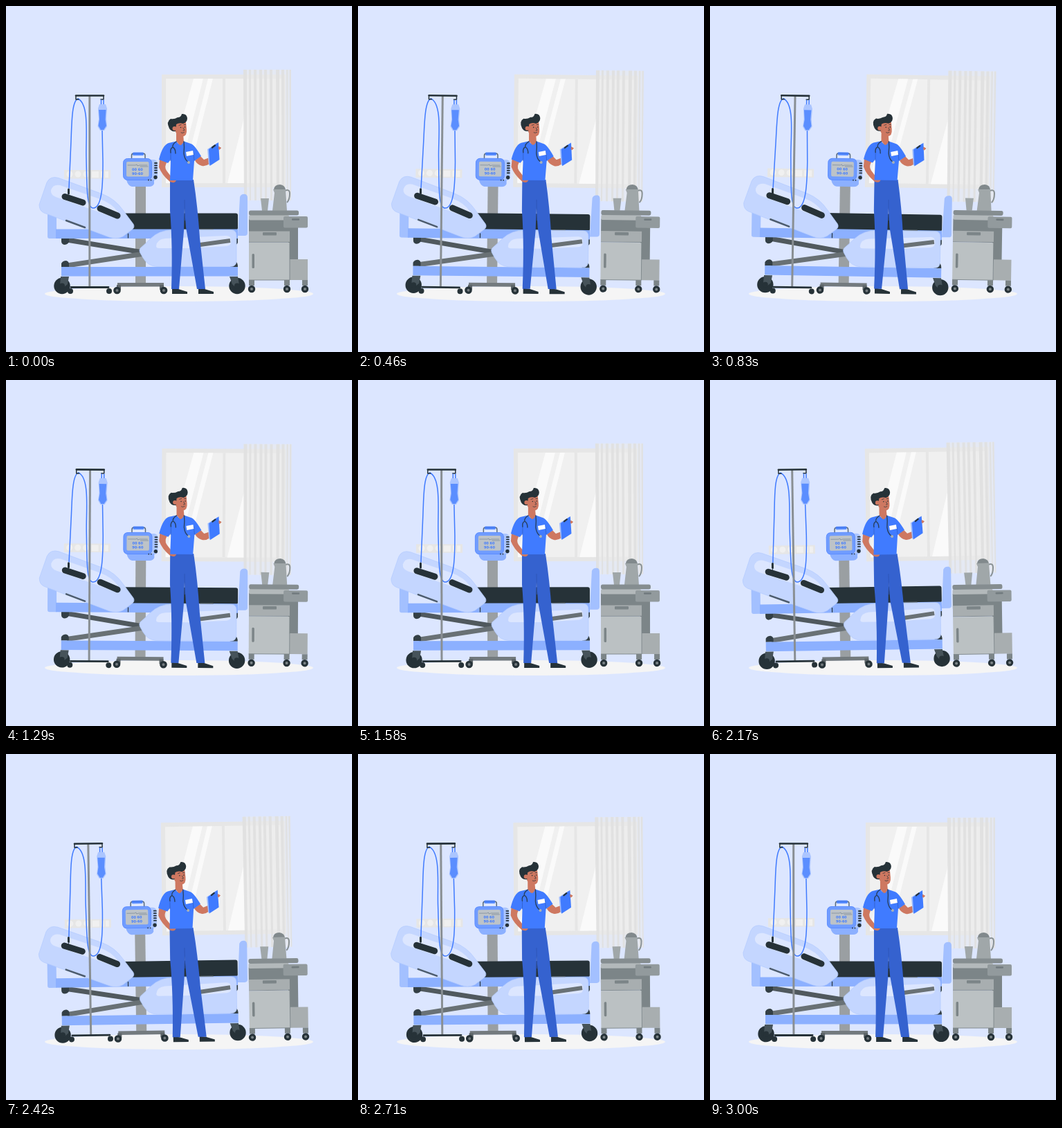
An HTML page for the animation above (3040 ms loop, 500 px wide and 500 px high).

```html
<!DOCTYPE html>
<html lang="en">
<head>
<meta charset="utf-8">
<title>Hospital room</title>
<style>
html, body { margin: 0; width: 100%; height: 100%; overflow: hidden; background: #dce6ff; }
svg { display: block; width: 100%; height: 100%; }
.dark { fill: #263238; }
.blue { fill: #407bff; }
.mid { fill: #8cb0ff; }
.pale { fill: #c4d6ff; }
.sky { fill: #dce6ff; }
.skin { fill: #ce7861; }
.line { fill: none; stroke: #263238; stroke-linecap: round; stroke-linejoin: round; }
.tube { fill: none; stroke: #407bff; stroke-width: 1.5; stroke-linecap: round; }
.readout { font: bold 5px "DejaVu Sans", sans-serif; fill: #407bff; }
</style>
</head>
<body>
<svg viewBox="0 0 500 500">
  <ellipse cx="250" cy="416" rx="194" ry="11" fill="#f5f5f5"/>

  <g data-pivot="248 186">
    <path fill="#e6e6e6" d="M225 99H404V262H225z"/>
    <path fill="#f0f0f0" d="M231 105H398V256H231z"/>
    <path fill="#fafafa" d="M271 105H285L247 256H231V250zM292 105H299L261 256H254zM346 153V256H320z"/>
    <path fill="#e6e6e6" d="M313 105h4v151h-4z"/>
    <path fill="#ebebeb" opacity=".6" d="M343 92H412V281H345z"/>
    <g id="folds" fill="#e0e0e0" opacity=".85"></g>
    <path fill="#e6e6e6" d="M84 237h67v12.500h-67z"/>
    <g fill="#f0f0f0"><circle cx="92" cy="243" r="4.500"/><circle cx="104" cy="243" r="4.500"/><circle cx="116" cy="243" r="4.500"/><path d="M124 239h10v9h-10zM137 239h4v9h-4zM143 239h5v9h-5z"/></g>
  </g>

  <g data-pivot="194 314">
    <path fill="#9a9fa2" d="M187 260h15v141h-15z"/>
    <path fill="#737a7e" d="M161 400H228V405.500H161z"/>
    <path fill="#5d6569" d="M160 403h6v7h-6zM222 403h6v7h-6z"/>
    <g class="dark"><circle cx="160.500" cy="411" r="5.300"/><circle cx="228" cy="411" r="5.300"/></g>
    <g fill="#737a7e"><circle cx="160.500" cy="411" r="2"/><circle cx="228" cy="411" r="2"/></g>
    <path class="line" style="stroke:#596a7c" stroke-width="1.500" d="M181.500 221V216Q181.500 213 184.500 213H198Q201 213 201 216V221"/>
    <rect class="blue" x="183" y="211.500" width="16" height="4.500" rx="1.500" opacity=".85"/>
    <path fill="#abc5ff" d="M208 222H214Q219 223 219 228V246Q219 252 213 252H208z"/>
    <path class="mid" d="M174 251H214V257Q212 261 207 261H182Q176 260 174 251z"/>
    <rect x="169.500" y="220.500" width="41" height="31" rx="6" fill="#709cff" stroke="#5c8dff"/>
    <rect x="174" y="225" width="32.500" height="21.500" rx="2" fill="#bdc3c8"/>
    <path class="line" stroke-width=".5" style="stroke:#596a7c" d="M176 230H187L189 229 190 231 193 230H204M194 232H205"/>
    <text class="readout" x="182" y="237.500">00 60</text>
    <text class="readout" x="182" y="243.500">90-60</text>
    <path class="line" stroke-width="1.800" d="M215 227h3M215 230.500h3M215 234h3M215 237.500h3M215 241h3"/>
    <circle class="dark" cx="216" cy="247.500" r="2.700"/>
    <g class="dark"><circle cx="206" cy="251.500" r=".9"/><circle cx="209.500" cy="251.500" r=".9"/></g>
  </g>

  <g data-pivot="198 331">
    <path fill="#a3c0ff" d="M60 270H73V336H63Q60 336 60 333zM335 332L338 276Q340 271 346 272Q349 273 349 277V328Q349 332 345 332z"/>
    <rect class="dark" x="165" y="299.500" width="170" height="24" rx="3"/>
    <g fill="none" stroke-width="7"><path stroke="#50595e" d="M88 338L204 357"/><path stroke="#697175" d="M88 375L206 357"/></g>
    <g fill="#333f45"><path id="lug" d="M80 335H91V341Q89 345 84 345Q80 344 80 340zM324 335H335V342Q333 346 329 345L324 341z"/><path d="M80 377V372Q82 368 87 368Q91 369 91 373V377zM324 377V372Q326 368 331 369Q335 370 335 377z"/></g>
    <path class="mid" d="M72 322.500H335V336H72zM80 377H335V390.500H80z"/>
    <path class="line" stroke-width="1.200" d="M176.500 329V335"/>
    <path class="line" stroke-width="2" style="stroke:#69747b" d="M281 323H299"/>
    <g class="dark"><circle cx="81" cy="404.500" r="11.700"/><circle cx="334" cy="404.500" r="11.700"/></g>
    <g fill="#46535a"><path d="M79 391H91L89 402 83 407 78 403zM323 391H335L337 403 332 407 327 402z"/></g>
    <g class="dark"><circle cx="81" cy="404.500" r="4"/><circle cx="334" cy="404.500" r="4"/></g>
    <path class="pale" stroke="#b2caff" stroke-width=".7" d="M48 287L59 255Q64 245 76 248.500L140 272Q158 279 169 295L184 315Q187 320 181 324L169 333Q160 338 149 334L55 299Q48 296 48 287z"/>
    <path class="sky" d="M65 266Q68 257 78 259L136 279Q153 285 162 298L165 304Q164 308 158 306L72 276Q64 273 65 266z"/>
    <path class="line" stroke-width="9" d="M85 275.500L111 284M136 292.500L161 303"/>
    <path class="line" stroke-width="2.500" style="stroke:#4d5c6c" d="M87 310L114 320"/>
    <path class="pale" stroke="#b2caff" stroke-width=".7" d="M194 350Q201 344 209 336Q222 323.500 241 323.500H325Q333 323.500 333 332V368Q333 376.500 325 376.500H218Q205 376 198 364L193.500 356Q192 353 194 350z"/>
    <path class="sky" d="M217 347Q218 337 230 336L317 332Q325 331 325 338V342Q325 346 319 347L266 350H221Q217 350 217 347z"/>
    <path fill="none" stroke="#697175" stroke-width="6" d="M266 347L324 339"/>
  </g>

  <g data-pivot="121 272">
    <path class="tube" d="M104 134C95 137 95 170 94 195L91 263"/>
    <path class="tube" d="M104 134C121 142 115 190 116 220C117 260 116 292 126 292C140 292 140 250 140 225L139 179"/>
    <path class="line" stroke-width="1" d="M90.500 273V279"/>
    <path class="line" stroke-width="3" d="M90.500 265V271"/>
    <path fill="#898f93" d="M119.300 130h3v276h-3z"/>
    <path class="line" stroke-width="2.600" stroke-linecap="butt" d="M101 129.500H141"/>
    <path class="line" stroke-width="1.500" d="M101 130V135H105M141 130V135H137"/>
    <path class="tube" stroke-width="1" d="M137.500 136V144M141 136V144"/>
    <path fill="#abc5ff" d="M135 142H144L146 148 145 163 146 174 142 180H136L132.500 174 134 163 133 148z"/>
    <path class="blue" opacity=".75" d="M134 150H144.500L143.500 164 145 173 141 179H137L133.500 173 135 164z"/>
    <path class="line" stroke-width="2.800" d="M94 406.500H148"/>
    <g class="dark"><circle cx="93" cy="412" r="4"/><circle cx="149" cy="412" r="4"/></g>
  </g>

  <g data-pivot="393 336">
    <path fill="#a0a7a9" d="M368 278H380L378 296H370z"/>
    <path fill="none" stroke="#899194" stroke-width="2" d="M403 267Q410 264 410 271Q410 280 406 284"/>
    <path fill="#a0a7a9" d="M386 265H404L406 296H385L388 270z"/>
    <path fill="#81898c" d="M387 265Q388 258 396 258Q403 259 404 265z"/>
    <path fill="#7c8588" d="M351 308H422V367H408V330H351z"/>
    <rect x="351" y="302" width="58" height="7.500" rx="2" fill="#b3b9bb"/>
    <rect x="351" y="295.500" width="72" height="7" rx="2.500" fill="#858d90"/>
    <rect x="401" y="304" width="35" height="16.500" rx="2" fill="#929a9d"/>
    <rect x="413" y="307" width="11" height="2.700" rx="1" fill="#727b7f"/>
    <path fill="#a8aeb0" d="M351 325.500H410V341H351zM410 366H436V396H410z"/>
    <path fill="#bbc1c3" d="M351 342H410V396H351z"/>
    <path fill="none" stroke="#7c8588" stroke-width=".9" d="M351 341.300H410V396H351"/>
    <rect x="371" y="327" width="20" height="4.500" rx="1" fill="#7c8588"/>
    <rect x="355.500" y="358" width="3.500" height="21" rx="1.500" fill="#7c8588"/>
    <g id="casters"></g>
  </g>

  <g data-pivot="265 286">
    <path class="dark" d="M240 408L249 409 262 413V416H240zM278 408L287 409 300 413V416H278z"/>
    <path fill="#3562cf" d="M237 251H271Q277 290 280 335L288 409H276L260 320 258 292 257 325 250 409H239Q241 345 237 296z"/>
    <path fill="none" stroke="#2c53b3" stroke-width=".8" d="M258 280L258.500 310"/>
    <path class="skin" d="M222 221L233 225Q228 232 232 238L239 247Q246 247 246 252Q244 257 237 254Q225 244 221 233zM273 223L281 217 286 222 294 219V228Q289 232 283 231Q276 229 273 223zM306 202L311 205 308 208z"/>
    <path class="skin" d="M246 184H256L257 197Q252 201 246 196z"/>
    <path class="blue" d="M235 198L246 195.500Q252 204 257 195.500L267 199Q272 200 282 217L272 224 270 252H237L238 222 234 227 221 222Q226 201 235 198z"/>
    <path fill="none" stroke="#315fc6" stroke-width=".8" d="M238 211V224M271 212L272 223"/>
    <path class="skin" d="M247 195Q252 207 257 195z"/>
    <path class="skin" d="M244 168Q253 163 260 168L261 178Q262 188 255 188.500Q245 188 244 178z"/>
    <path class="dark" d="M236 177Q231 167 238 163Q243 164 248 161Q253 161 254 156Q261 155 262 162Q262 168 256 170Q250 168 246 171L245 181Q239 182 236 177z"/>
    <circle class="skin" cx="243.500" cy="177" r="3"/>
    <g class="dark"><circle cx="252.500" cy="175.500" r=".8"/><circle cx="258.500" cy="175" r=".8"/></g>
    <path class="line" stroke-width=".7" d="M250 172.500L253 171.500M257 171.500H259.500M256 176L258 179.500 256 180M253 183Q255 184.500 257.500 182.500"/>
    <path class="line" stroke-width="1.400" style="stroke:#28405f" d="M246 196Q240 200 241 204Q237 206 238 212M241 204Q245 206 245 213M257 196Q258 204 257 213Q258 222 263 225"/>
    <circle cx="264" cy="226" r="2" fill="#a8b1b8"/>
    <path fill="#fff" d="M260 211L270 209 271 215 261 217z"/>
    <path fill="#9dbcff" d="M291 207L305 198 306 222 293 230z"/>
    <path class="blue" d="M293 207L307 197 308.500 222 294.500 231z"/>
    <path class="line" stroke-width="2.200" d="M298 204.500L302 201.500"/>
    <path class="skin" d="M307 203L311 205 309 207 307 207z"/>
  </g>
</svg>
<script>
const byId = id => document.getElementById(id);

const foldEdges = [[343, 5], [351, 3], [358, 4], [366, 4], [373, 4], [381, 4], [390, 5], [398, 4], [405, 2.5], [409.5, 2.5]];
byId('folds').innerHTML = foldEdges
  .map(([x, w]) => `<path d="M${x} 92h${w}v189h${-w + 1}z"/>`).join('');

byId('casters').innerHTML = [355, 406, 432].map(x => `
  <path fill="#7c8588" d="M${x - 4} 396h8v8h-8z"/>
  <circle class="dark" cx="${x}" cy="409" r="5.2"/>
  <circle fill="#7c8588" cx="${x}" cy="409" r="2"/>`).join('');

const LOOP = 3040;
const swaying = [...document.querySelectorAll('[data-pivot]')];

// Linear swing 0 → 1 → -1 → 0 degrees over one loop.
function swing(p) {
  if (p < 0.25) return p * 4;
  return p < 0.75 ? 2 - p * 4 : p * 4 - 4;
}

function draw(time) {
  const angle = swing((time % LOOP) / LOOP);
  for (const group of swaying) {
    group.setAttribute('transform', `rotate(${angle} ${group.dataset.pivot})`);
  }
}

let start;
function tick(now) {
  start ??= now;
  draw(now - start);
  requestAnimationFrame(tick);
}
draw(0);
requestAnimationFrame(tick);
</script>
</body>
</html>
```
